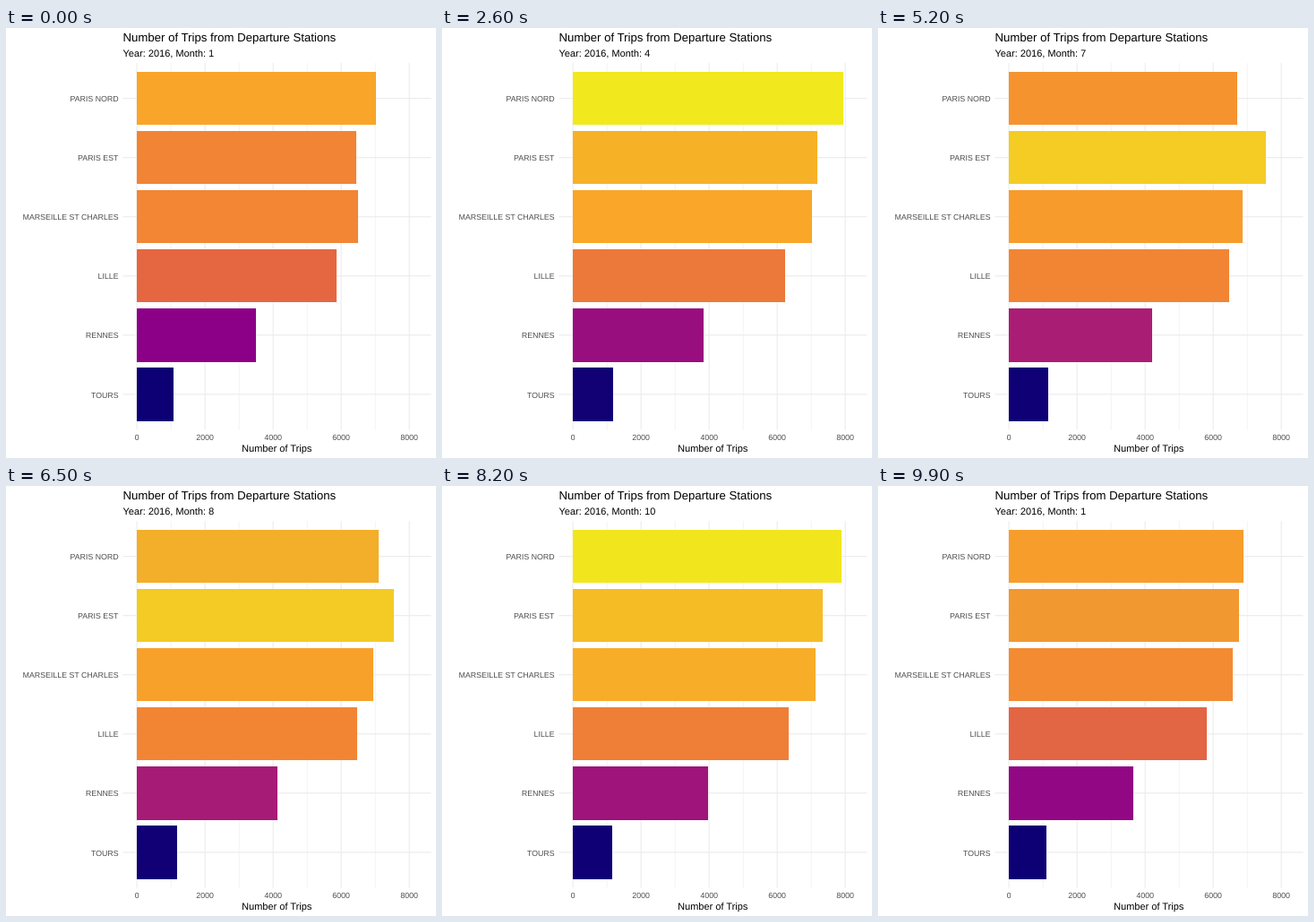
A matplotlib script for the animation above (10 s loop, 480x480 px).

```python
import math
import numpy as np
import matplotlib.pyplot as plt
from matplotlib.animation import FuncAnimation
from matplotlib.colors import to_rgb
from matplotlib.patches import PathPatch, Rectangle
from matplotlib.textpath import TextPath
from matplotlib.transforms import Affine2D

plt.rcParams["font.family"] = "Liberation Sans"

SIZE = 480
LEFT, RIGHT, TOP, BOTTOM = 130.5, 474.5, 39, 448.5
X0, SCALE = 146.14, 0.038         # pixel of zero, pixels per trip
ROW = (BOTTOM - TOP) / 6.2
BAR = 0.9 * ROW
GRID, LABEL = "#ebebeb", "#4d4d4d"

STATIONS = ["PARIS NORD", "PARIS EST", "MARSEILLE ST CHARLES",
            "LILLE", "RENNES", "TOURS"]

# Trips per station at the turning points, each held for a run of months
RUNS = [1, 4, 1, 2, 1, 2, 1]
TURNS = [
    [7020, 6450, 6500, 5870, 3500, 1080],
    [7940, 7180, 7030, 6230, 3840, 1185],
    [7460, 7540, 6270, 5310, 3540, 1080],
    [6710, 7550, 6870, 6470, 4210, 1160],
    [8235, 7530, 7190, 6500, 3920, 1200],
    [7900, 7340, 7130, 6340, 3980, 1150],
    [6500, 7660, 6820, 5660, 4130, 1170],
]
TRIPS = np.repeat(TURNS, RUNS, axis=0)
MONTHS = len(TRIPS)

SHADES = {1080: "#0c0074", 3500: "#8b0087", 4210: "#a91e74", 5870: "#e46742",
          6480: "#f28534", 7020: "#f9a529", 7530: "#f4ca24", 8235: "#eeff19"}

FRAMES, INTERVAL, STEPS = 100, 100, 4


def fill(trips):
    rgb = np.array([to_rgb(c) for c in SHADES.values()])
    return np.stack([np.interp(trips, list(SHADES), channel)
                     for channel in rgb.T], axis=-1)


COLORS = fill(TRIPS)

fig = plt.figure(figsize=(SIZE / 72, SIZE / 72), dpi=72, facecolor="white")
ax = fig.add_axes([0, 0, 1, 1])
ax.set_xlim(0, SIZE)
ax.set_ylim(SIZE, 0)
ax.axis("off")


def line(xs, ys, width=1.07):
    ax.plot(xs, ys, color=GRID, lw=width, solid_capstyle="butt",
            snap=False, zorder=1)


def write(x, y, s, size, color="black", align=0):
    """Outline text on baseline y; align 0 is left, 0.5 centre, 1 right."""
    path = TextPath((0, 0), s, size=size)
    if align:
        box = path.get_extents()
        x -= box.x0 + align * box.width
    place = Affine2D().scale(1, -1).translate(x, y) + ax.transData
    return ax.add_patch(PathPatch(path, fc=color, lw=0, snap=False,
                                  transform=place, zorder=3))


for trips in range(0, 8001, 1000):
    x = X0 + trips * SCALE
    if trips % 2000:
        line([x, x], [TOP, BOTTOM], 0.53)
    else:
        line([x, x], [TOP, BOTTOM])
        write(x, 460, str(trips), 8.8, LABEL, 0.5)

bars = []
for row, name in enumerate(STATIONS):
    y = TOP + (row + 0.6) * ROW
    line([LEFT, RIGHT], [y, y])
    write(125.2, math.ceil(y + 3.15), name, 8.8, LABEL, 1)
    bar = Rectangle((X0, y - BAR / 2), 1, BAR, lw=0, zorder=2)
    bars.append(ax.add_patch(bar))

write(LEFT, 15, "Number of Trips from Departure Stations", 13.2)
write((LEFT + RIGHT) / 2, 473, "Number of Trips", 11, align=0.5)
subtitles = [write(LEFT, 32, f"Year: 2016, Month: {m + 1}", 11)
             for m in range(MONTHS)]


def start(month):
    """Frame at which the move to the next month begins."""
    return min(5 + 9 * month, 9 + 8 * month)


def update(i):
    month = max((m for m in range(MONTHS) if start(m) <= i), default=0)
    p = min(max((i - start(month) + 1) / STEPS, 0), 1)
    after = (month + 1) % MONTHS
    trips = (1 - p) * TRIPS[month] + p * TRIPS[after]
    colors = (1 - p) * COLORS[month] + p * COLORS[after]
    for bar, t, c in zip(bars, trips, colors):
        bar.set_width(t * SCALE)
        bar.set_facecolor(c)
    shown = after if p > 0.5 else month
    for m, text in enumerate(subtitles):
        text.set_visible(m == shown)
    return bars + subtitles


anim = FuncAnimation(fig, update, frames=FRAMES, interval=INTERVAL,
                     repeat=True, repeat_delay=0)
plt.show()
```
